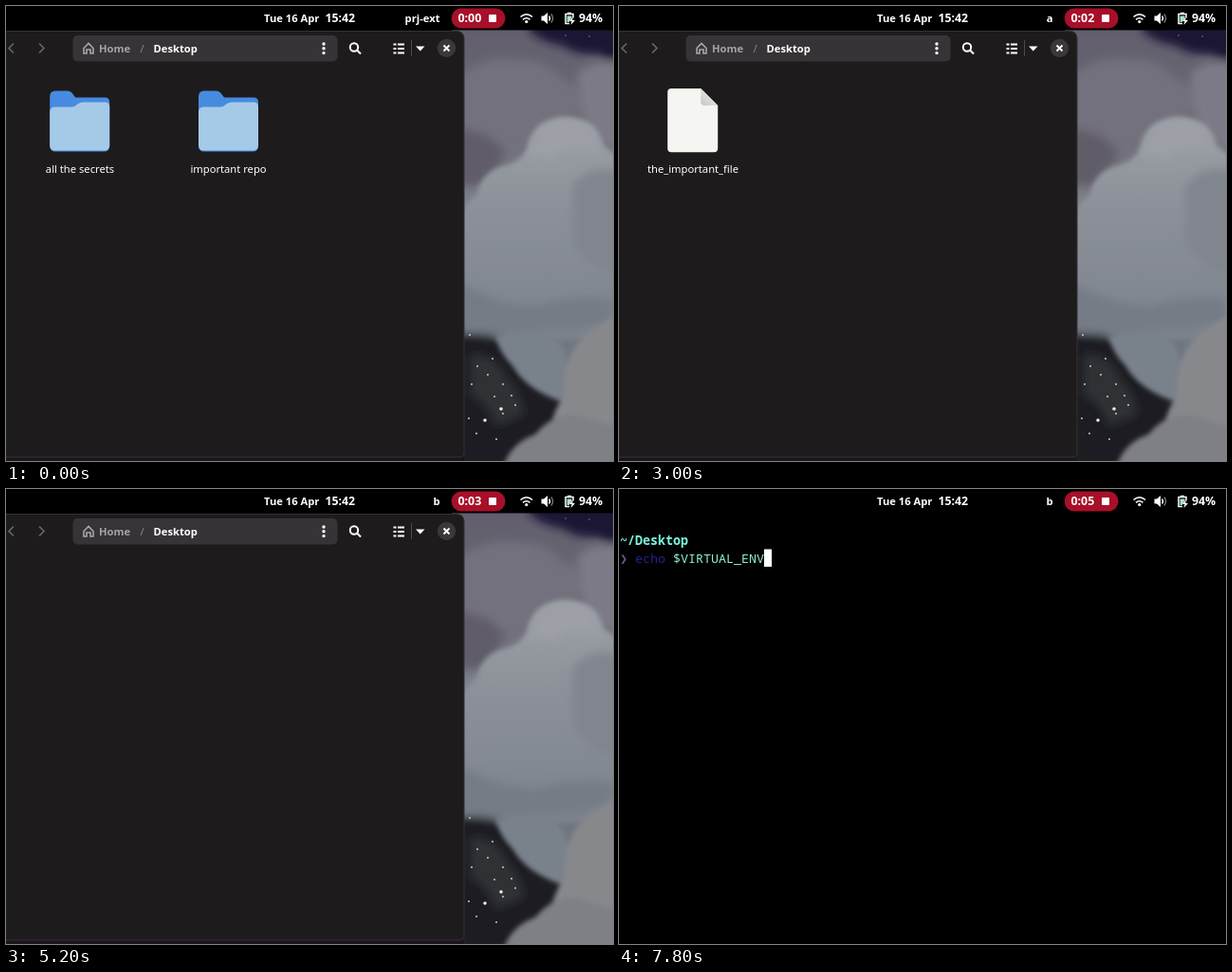
An HTML page that plays this animation: 640x480 px, repeating every 8000 ms.

```html
<!DOCTYPE html>
<html lang="en">
<head>
<meta charset="utf-8">
<title>Environment switcher</title>
<style>
html, body { margin: 0; width: 100%; height: 100%; overflow: hidden; background: #000; }
#stage { display: block; width: 100vw; height: 100vh; }
text { font-family: "Noto Sans", "Open Sans", sans-serif; font-size: 11.2px; fill: #fff; white-space: pre; }
.mid { text-anchor: middle; }
.end { text-anchor: end; }
.bold { font-weight: 700; }
.big { font-size: 33.5px; }
.num { font-size: 12.4px; font-weight: 600; }
.mono { font-family: "Noto Sans Mono", "DejaVu Sans Mono", monospace; font-size: 13.333px; }
.line { fill: none; stroke: #fff; stroke-width: 1.6; }

/* every state change is a hard cut on one 8 s clock */
.timer, .env, .folders, .file, .popup, .pick, .term, .cmd, .caret, .prompt {
  animation: 8s step-end infinite;
}
.timer { animation-name: timer; }
.env { animation-name: env; }
.folders { animation-name: folders; }
.file { animation-name: file; }
.popup { animation-name: popup; }
.pick { animation-name: pick; }
.term { animation-name: term; transform-origin: 320px 450px; }
.cmd { animation-name: cmd; }
.caret { animation-name: caret; }
.prompt { animation-name: prompt; }

@keyframes timer {
  0% { transform: none; }
  17.5% { transform: translateY(-20px); }
  37.5% { transform: translateY(-40px); }
  57.5% { transform: translateY(-60px); }
  77.5% { transform: translateY(-80px); }
  97.5%, 100% { transform: translateY(-100px); }
}
@keyframes env {
  0% { transform: none; }
  25% { transform: translateY(-20px); }
  65%, 100% { transform: translateY(-40px); }
}
@keyframes folders { 0% { opacity: 1; } 27.5% { opacity: 0; } 67.5%, 100% { opacity: 1; } }
@keyframes file { 0% { opacity: 0; } 30% { opacity: 1; } 65%, 100% { opacity: 0; } }
@keyframes popup {
  0% { opacity: 0; }
  10% { opacity: 1; }
  27.5% { opacity: .5; }
  30% { opacity: 0; }
  47.5% { opacity: 1; }
  65%, 100% { opacity: 0; }
}
@keyframes pick {
  0% { transform: none; }
  11.25% { transform: translateX(114.5px); }
  13.75% { transform: translateX(229px); }
  50% { transform: none; }
  51.25%, 100% { transform: translateX(114.5px); }
}
@keyframes term {
  0% { opacity: 0; transform: scale(.9906); }
  81.25% { opacity: 1; transform: scale(.9906); }
  83.75% { opacity: 1; transform: scale(.997); }
  85%, 100% { opacity: 1; transform: none; }
}
@keyframes cmd { 0% { opacity: 0; } 91.25%, 100% { opacity: 1; } }
@keyframes caret { 0% { transform: none; } 91.25%, 100% { transform: translateX(136px); } }
@keyframes prompt { 0% { fill: #a03a90; } 83.75%, 100% { fill: #74508f; } }
</style>
</head>
<body>
<svg id="stage" viewBox="0 0 640 480" preserveAspectRatio="none">
  <defs>
    <filter id="soft" x="-20%" y="-20%" width="140%" height="140%"><feGaussianBlur stdDeviation="5"/></filter>
    <filter id="edge" x="-20%" y="-20%" width="140%" height="140%"><feGaussianBlur stdDeviation="2.4"/></filter>
    <filter id="shade" x="-20%" y="-20%" width="140%" height="150%"><feGaussianBlur stdDeviation="5"/></filter>
    <linearGradient id="sky" x1="0" y1="0" x2="0" y2="1">
      <stop offset="0" stop-color="#625e6d"/>
      <stop offset=".2" stop-color="#6b6975"/>
      <stop offset=".45" stop-color="#82868e"/>
      <stop offset=".7" stop-color="#70767f"/>
    </linearGradient>
    <linearGradient id="cloud" x1="0" y1="0" x2="0" y2="1">
      <stop offset="0" stop-color="#9da1a7"/>
      <stop offset=".4" stop-color="#8c9199"/>
      <stop offset="1" stop-color="#7c828b"/>
    </linearGradient>
    <linearGradient id="fold" x1="0" y1="1" x2="1" y2="0">
      <stop offset="0" stop-color="#c8c8c6"/>
      <stop offset=".6" stop-color="#e0e0de"/>
    </linearGradient>
    <g id="folder">
      <path fill="#478be0" d="M46.200 95.500q0-6 6-6h12q4 0 6 3l3 4h30.800q5.200 0 5.200 5v46q0 6-6 6h-51q-6 0-6-6z"/>
      <path fill="#a5cae8" d="M46.200 111.500q0-5 6-5h17q3 0 5-2l2-1.500q2-1.500 5-1.500h23q5 0 5 5v40.500q0 5.500-6 5.500h-51q-6 0-6-5.500z"/>
    </g>
  </defs>

  <!-- wallpaper -->
  <g>
    <rect x="470" y="25" width="170" height="455" fill="url(#sky)"/>
    <g filter="url(#soft)">
      <path fill="#1f1636" d="M552 10h105v48q-20 2-35-8-20 3-34-8-24-4-36-16z"/>
      <path fill="#73717d" d="M475 75q35-25 65-18 35 0 45 20 25 5 20 35l-40 40-90 5z"/>
      <path fill="#605d69" d="M475 130q35 0 52 25l-20 35h-32z"/>
      <path fill="#7b7a86" d="M602 72q20-20 50-10v90l-40-10z"/>
    </g>
    <g filter="url(#edge)">
      <path fill="url(#cloud)" d="M478 245q-4-30 18-45 5-28 35-33 12-5 18-16 5-32 40-34 34 0 41 30l20 15v190h-80q-25 10-45-3-40 4-47-30z"/>
    </g>
    <g filter="url(#soft)">
      <path fill="#9da0a6" d="M552 160q8-36 40-37 30 4 31 32-28-14-45 5-16-8-26 0z"/>
      <path fill="#80858e" d="M597 190q20-25 50-15v110q-35-10-50-35z"/>
      <path fill="#747b85" d="M475 290q40 25 85 27 30-12 80-7v22q-40 12-80 10-50 12-85-2z"/>
      <path fill="#1b1c20" d="M475 347q35-4 50 6 22 45 66 64l-20 73h-96z"/>
      <path fill="#454548" d="M490 368q26-2 38 25 16 16 18 38l-30 12q-8-26-26-32z" opacity=".5"/>
    </g>
    <g filter="url(#edge)">
      <path fill="#79818b" d="M516 348q35-7 64 3 20 20 8 66-40-12-54-38-13-12-18-31z"/>
      <path fill="#87888c" d="M588 412q-2-50 32-72l30-18v168h-84q5-55 22-78z"/>
      <path fill="#7f8085" d="M524 487q8-26 34-35 18-22 42-21l52 15v50z"/>
    </g>
    <path stroke="#c9c9c5" stroke-width="2" stroke-linecap="round" d="M489 347h0M497 380h0M513 372h0M491 399h0M508 389h0M524 399h0M533 411h0M515 412h0M488 435h0M537 421h0M524 430h0M496 451h0M517 457h0"/>
    <path stroke="#ecebe3" stroke-width="3.600" stroke-linecap="round" d="M505 437h0M522 425h0"/>
    <path stroke="#888197" stroke-width="1.500" stroke-linecap="round" d="M590 31h0M615 32h0"/>
    <rect y="470" width="483" height="10" fill="#1d131d"/>
  </g>

  <!-- file manager -->
  <path fill="#1e1b1d" d="M0 26.500h475q8 0 8 8V472q0 4-4 4H0z"/>
  <path fill="none" stroke="#343134" d="M0 26.500h475q8 0 8 8V472q0 4-4 4H0"/>
  <rect x="70.500" y="31" width="279" height="27.500" rx="5" fill="#363436"/>
  <path class="line" style="stroke:#69676a" d="M8 39.500l-5 5 5 5M35 39.500l5 5-5 5"/>
  <path class="line" style="stroke:#a8a6a8" d="M82 44.500l5-5 5 5V50h-3v-4h-4v4h-3z"/>
  <text class="bold" x="98" y="48.500" style="fill:#a5a3a5">Home</text>
  <text x="141.500" y="48.500" style="fill:#8c8a8c">/</text>
  <text class="bold" x="155.500" y="48.500">Desktop</text>
  <path stroke="#fff" stroke-width="3.400" stroke-linecap="round" d="M335 40h0M335 44.800h0M335 49.600h0"/>
  <circle class="line" cx="367" cy="43.500" r="4.200" style="stroke-width:2"/>
  <path class="line" style="stroke-width:2" d="M370 46.500l4 4"/>
  <path class="line" style="stroke-width:2" d="M408.500 40.500h3M408.500 45h3M408.500 49.500h3M413 40.500h7M413 45h7M413 49.500h7"/>
  <path stroke="#4b494b" d="M427.500 36v17"/>
  <path fill="#fff" d="M432 42.500h9.500l-4.750 5z"/>
  <circle cx="464.500" cy="44.500" r="9.700" fill="#3a383a"/>
  <path class="line" style="stroke-width:1.900" d="M461.500 41.500l6 6M467.500 41.500l-6 6"/>

  <g class="folders">
    <use href="#folder"/>
    <use href="#folder" x="156.800"/>
    <text class="mid" x="78" y="175.500">all the secrets</text>
    <text class="mid" x="234.500" y="175.500">important repo</text>
  </g>
  <g class="file">
    <path fill="#f5f5f2" d="M51.200 91q0-4 4-4h31l18 18v45.300q0 4-4 4h-45q-4 0-4-4z"/>
    <path fill="url(#fold)" d="M86.200 87l18 18h-14q-4 0-4-4z"/>
    <text class="mid" x="78" y="175.500">the_important_file</text>
  </g>

  <!-- switcher -->
  <g class="popup">
    <rect x="147" y="187" width="345" height="121" rx="22" opacity=".4" filter="url(#shade)"/>
    <rect x="142.500" y="177.500" width="354" height="125" rx="21" fill="#353433" stroke="#3d3c3b"/>
    <rect class="pick" x="153" y="187" width="104.500" height="105" rx="11" fill="#4c4b4c"/>
    <path fill="#fff" d="M315.500 190l3.750-3.500 3.750 3.500z"/>
    <text class="mid big" x="204.700" y="246">exa</text>
    <text class="mid big" x="319.200" y="246">a</text>
    <text class="mid big" x="433.500" y="246">b</text>
    <text class="mid" x="204.700" y="282.500">example</text>
    <text class="mid" x="319.200" y="282.500">a</text>
    <text class="mid" x="433.500" y="282.500">b</text>
  </g>

  <!-- terminal -->
  <g class="term">
    <rect y="25" width="640" height="464"/>
    <text class="mono bold" x="1" y="59" style="fill:#7df3dc">~/Desktop</text>
    <text class="mono prompt" x="1" y="78">❯</text>
    <text class="mono cmd" x="17" y="78"><tspan fill="#2b1c93">echo</tspan><tspan fill="#8cecd6"> $VIRTUAL_ENV</tspan></text>
    <rect class="caret" x="17" y="63.500" width="8" height="18.500" fill="#fff"/>
  </g>

  <!-- top bar -->
  <rect width="640" height="25.500"/>
  <text class="bold" x="272" y="17">Tue 16 Apr</text>
  <text class="bold" x="336.500" y="17" style="font-size:12.300px">15:42</text>
  <svg x="400" y="3" width="60" height="20">
    <g class="env">
      <text class="end bold" x="57.500" y="14">prj-ext</text>
      <text class="end bold" x="57.500" y="34">a</text>
      <text class="end bold" x="57.500" y="54">b</text>
    </g>
  </svg>
  <rect x="469.700" y="2.400" width="56.800" height="21.200" rx="10.600" fill="#a80f28"/>
  <svg x="470" y="3" width="36" height="20">
    <g class="timer">
      <text class="num" x="6.500" y="14">0:00</text>
      <text class="num" x="6.500" y="34">0:01</text>
      <text class="num" x="6.500" y="54">0:02</text>
      <text class="num" x="6.500" y="74">0:03</text>
      <text class="num" x="6.500" y="94">0:04</text>
      <text class="num" x="6.500" y="114">0:05</text>
    </g>
  </svg>
  <rect x="509" y="9" width="8" height="8" rx="1" fill="#fff"/>
  <path class="line" d="M542.500 11.500q6.250-5.500 12.500 0M545 14.300q3.750-3 7.500 0"/>
  <circle cx="548.750" cy="16.600" r="1.600" fill="#fff"/>
  <path fill="#fff" d="M564.500 10.500h2.500l4-3.500v12l-4-3.500h-2.500z"/>
  <path class="line" style="stroke-width:1.400" d="M572.500 10.500q2 2.500 0 5"/>
  <path class="line" style="stroke:#777;stroke-width:1.400" d="M574.800 8.500q3.500 4.500 0 9"/>
  <path class="line" style="stroke-width:1.500" d="M594 18.500h-4V8.500h8v4M592 7.500h4"/>
  <path fill="#a9e3c4" d="M591.500 10.500h5v2l-3 4.500h-2z"/>
  <path fill="#fff" d="M597.500 11.500l-3.500 4.500h2.500l-1 4 4.500-5h-2.700z"/>
  <text x="604" y="17" style="font-size:12.300px;font-weight:600">94%</text>
</svg>
</body>
</html>
```
